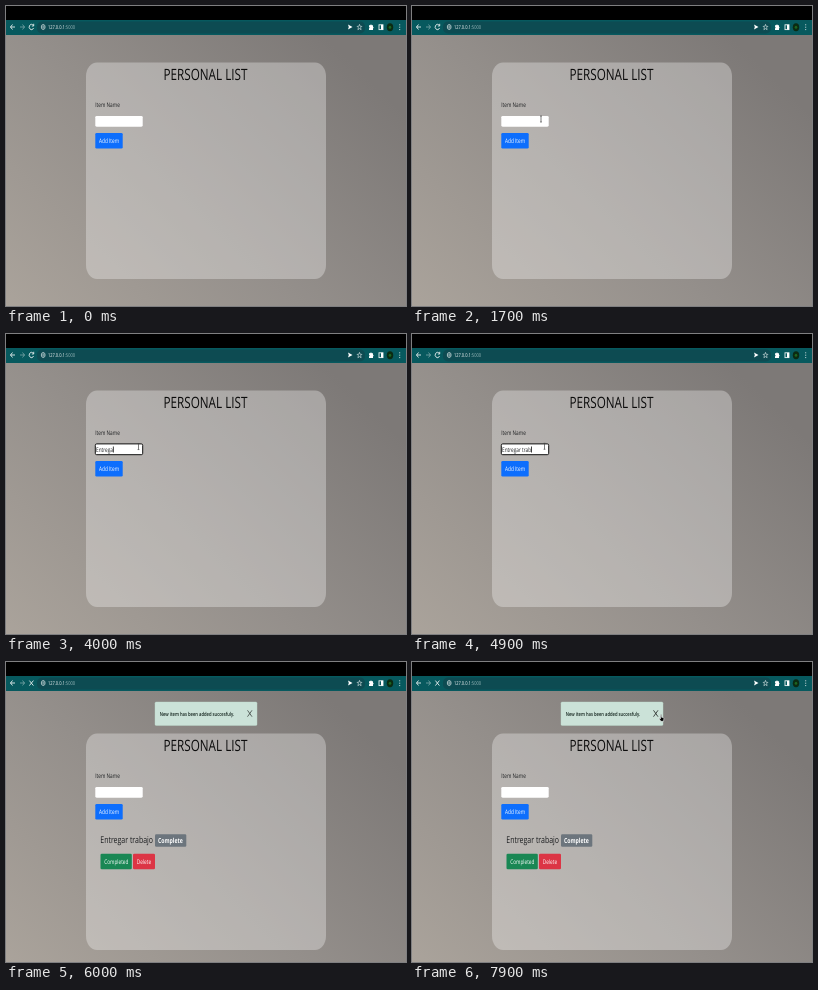
Animation of 400 by 300 pixels, one loop 8000 ms. Source, as an HTML page:

```html
<!DOCTYPE html>
<html lang="en">
<meta charset="utf-8">
<title>Personal list</title>
<style>
  html, body { margin: 0; width: 100%; height: 100%; overflow: hidden; background: #000 }
  svg { display: block; width: 100vw; height: 100vh }
  /* the 16:9 screen is shown at 4:3, so all type is equally narrow */
  text {
    font: 6.3px "Open Sans", "Noto Sans", sans-serif;
    fill: #1c1e20; white-space: pre; text-rendering: geometricPrecision;
    transform-box: fill-box; transform: scaleX(.75);
  }
  .title { font-size: 15.6px; fill: #0c0c0c }
  .heading { font-size: 9.3px }
  .badge { font-size: 6.9px; font-weight: 700 }
  .alert { font-size: 5.5px; font-weight: 600; fill: #10201a }
  .url { font-size: 5.3px; fill: #fff }
  .url tspan { fill: #9dbcbe }
  .light { fill: #fff }
  .icon { fill: none; stroke: #e8f0f0; stroke-width: .9 }
  .pointer { fill: #000; stroke: #fff; stroke-width: .5 }
</style>
<svg viewBox="0 0 400 300" preserveAspectRatio="none">
  <defs>
    <linearGradient id="wall" x1="0" y1="1" x2="1" y2=".3">
      <stop stop-color="#aaa39b"/>
      <stop offset=".5" stop-color="#948f8b"/>
      <stop offset="1" stop-color="#7d7977"/>
    </linearGradient>
  </defs>
  <rect y="28" width="400" height="272" fill="url(#wall)"/>

  <g id="browser">
    <rect width="400" height="14" fill="#000"/>
    <rect y="14" width="400" height="15" fill="#07595e"/>
    <rect x="31" y="15.5" width="328" height="12" rx="5" fill="#0d4b52"/>
    <path class="icon" d="M9 21H4.500M6.500 18.500L4.500 21l2 2.500"/>
    <path class="icon" d="M14 21h4.500M16.500 18.500l2 2.500-2 2.500" opacity=".45"/>
    <path class="icon" id="reload" d="M27.300 19.500A2.200 2.700 0 1 0 27.500 22M27.700 17.800v2.200h-1.900"/>
    <path class="icon" id="stop" d="M23.400 18.600l4 5M27.400 18.600l-4 5"/>
    <ellipse class="icon" cx="37.200" cy="21" rx="1.900" ry="2.500" opacity=".7"/>
    <path class="icon" d="M35.300 21h3.800M37.200 18.500v5" opacity=".5" stroke-width=".5"/>
    <text class="url" x="42" y="23">127.0.0.1<tspan>:5000</tspan></text>
    <path class="light" d="M342 18.500l4.500 2.500-4.500 2.500.8-2.500z"/>
    <path class="icon" stroke-width=".7" d="M353.500 18.400l.7 1.900 1.700.1-1.300 1.300.5 2-1.600-1.100-1.600 1.100.5-2-1.300-1.300 1.700-.1z" style="stroke-width:.6"/>
    <path class="light" d="M363 19.300h1.200a.8.9 0 0 1 1.600 0h1.200v1.400a.8.9 0 0 1 0 1.700v1.500h-4v-1.500a.8.9 0 0 0 0-1.700z"/>
    <rect class="icon" x="373" y="18.800" width="4" height="4.800"/>
    <rect class="light" x="375" y="18.800" width="2" height="4.800"/>
    <ellipse cx="384" cy="21.200" rx="3.200" ry="4" fill="#0b2a12"/>
    <ellipse cx="384" cy="21.200" rx="1.300" ry="1.500" fill="#1d6420"/>
    <path class="icon" d="M393.700 18.300v1M393.700 20.700v1M393.700 23.100v1"/>
  </g>

  <g id="page">
    <rect x="80" y="56.500" width="240" height="216.500" rx="11" ry="14" fill="#fff" fill-opacity=".31"/>
    <text class="title" x="157.500" y="74.300">PERSONAL LIST</text>
    <text x="89.300" y="101.300">Item Name</text>
    <rect id="field" x="89.300" y="109.900" width="47.400" height="10.800" rx="1.400" fill="#fff"/>
    <text id="typed" x="90" y="117.700"></text>
    <rect id="caret" y="112.500" width=".8" height="6" fill="#111"/>
    <rect x="89.300" y="127" width="27.400" height="15.500" rx="1.300" fill="#0d6efd"/>
    <text class="light" x="93" y="137.200">Add Item</text>
  </g>

  <g id="added">
    <rect x="149" y="40" width="102" height="23.500" rx="1.300" fill="#cbe2d8" stroke="#badbcc" stroke-width=".4"/>
    <text class="alert" x="153.800" y="53.900">New item has been added succesfuly.</text>
    <path id="close" d="M241.500 48.300l4.500 6.400M246 48.300l-4.500 6.400" stroke="#000" stroke-width=".8"/>
    <text class="heading" x="94.300" y="181.200">Entregar trabajo</text>
    <rect x="149" y="172.300" width="31.300" height="12.500" rx="1.300" fill="#6c757d"/>
    <text class="badge light" x="152" y="181.200">Complete</text>
    <rect x="94.500" y="191.700" width="31.300" height="15.500" rx="1.300" fill="#198754"/>
    <text class="light" x="98.200" y="201.900">Completed</text>
    <rect x="127" y="191.700" width="22" height="15.500" rx="1.300" fill="#dc3545"/>
    <text class="light" x="130.800" y="201.900">Delete</text>
  </g>

  <g id="cursor">
    <path id="arrow" class="pointer" d="M0 0v6.500l1.200-1.200.9 2.100.8-.5-.9-2H3.800z"/>
    <path id="beam" d="M-.9-3h1.800M0-3v6M-.9 3h1.800" fill="none" stroke="#444" stroke-width=".7"/>
    <path id="hand" class="pointer" d="M-.5-2.500q.6-.8 1.100 0v2.300l1.900.5q.5.200.4.900l-.4 2.600h-2.600l-1.700-2.500q.1-.8.800-.3l.5.500z"/>
  </g>
</svg>
<script>
const $ = id => document.getElementById(id);
const show = (id, on) => $(id).style.display = on ? '' : 'none';
const LOOP = 8000, STEP = 100;
const FOCUS = 1800, SUBMIT = 5700, ADDED = 6000;
const phrase = 'Entregar trabajo';
const keyTimes = [2600, 2800, 3000, 3200, 3400, 3900, 4000, 4100, 4200,
                  4400, 4600, 4700, 4900, 5000, 5200, 5300];

// time, x, y of the mouse
const mousePath = [
  [800, 329, 66], [1600, 129, 113], [1900, 129, 113], [2000, 132.5, 113],
  [6400, 132.5, 112], [7300, 229, 51], [7900, 249, 55.5]
];

function mouseAt(t) {
  const i = mousePath.findIndex(p => p[0] >= t);
  if (i < 1) return mousePath[i < 0 ? mousePath.length - 1 : 0].slice(1);
  const [t0, x0, y0] = mousePath[i - 1], [t1, x1, y1] = mousePath[i];
  const p = (t - t0) / (t1 - t0), ease = p * p * (3 - 2 * p);
  return [x0 + (x1 - x0) * ease, y0 + (y1 - y0) * ease];
}

function draw(t) {
  const added = t >= ADDED, focused = t >= FOCUS && !added;
  const loading = t >= SUBMIT;
  show('reload', !loading);
  show('stop', loading);
  show('added', added);
  $('page').setAttribute('transform', `translate(0 ${added ? 15 : 0})`);

  $('field').setAttribute('stroke', focused ? '#111' : 'none');
  $('typed').textContent = added ? '' : phrase.slice(0, keyTimes.filter(k => k <= t).length);
  show('caret', focused && !(t >= 2400 && t < 2600));
  $('caret').setAttribute('x', 90 + $('typed').getComputedTextLength() * .75);

  const [x, y] = mouseAt(t);
  const beam = t >= 1600 && t < SUBMIT, hand = t >= 7400;
  show('cursor', t >= 800 && (t < ADDED || t >= 6500));
  show('beam', beam);
  show('hand', hand);
  show('arrow', !beam && !hand);
  $('cursor').setAttribute('transform', `translate(${x} ${y})`);
  $('close').setAttribute('opacity', hand ? .85 : .7);
}

const start = performance.now();
function tick() {
  const t = (performance.now() - start) % LOOP;
  draw(Math.floor(t / STEP) * STEP);
  requestAnimationFrame(tick);
}
tick();
</script>
</html>
```
